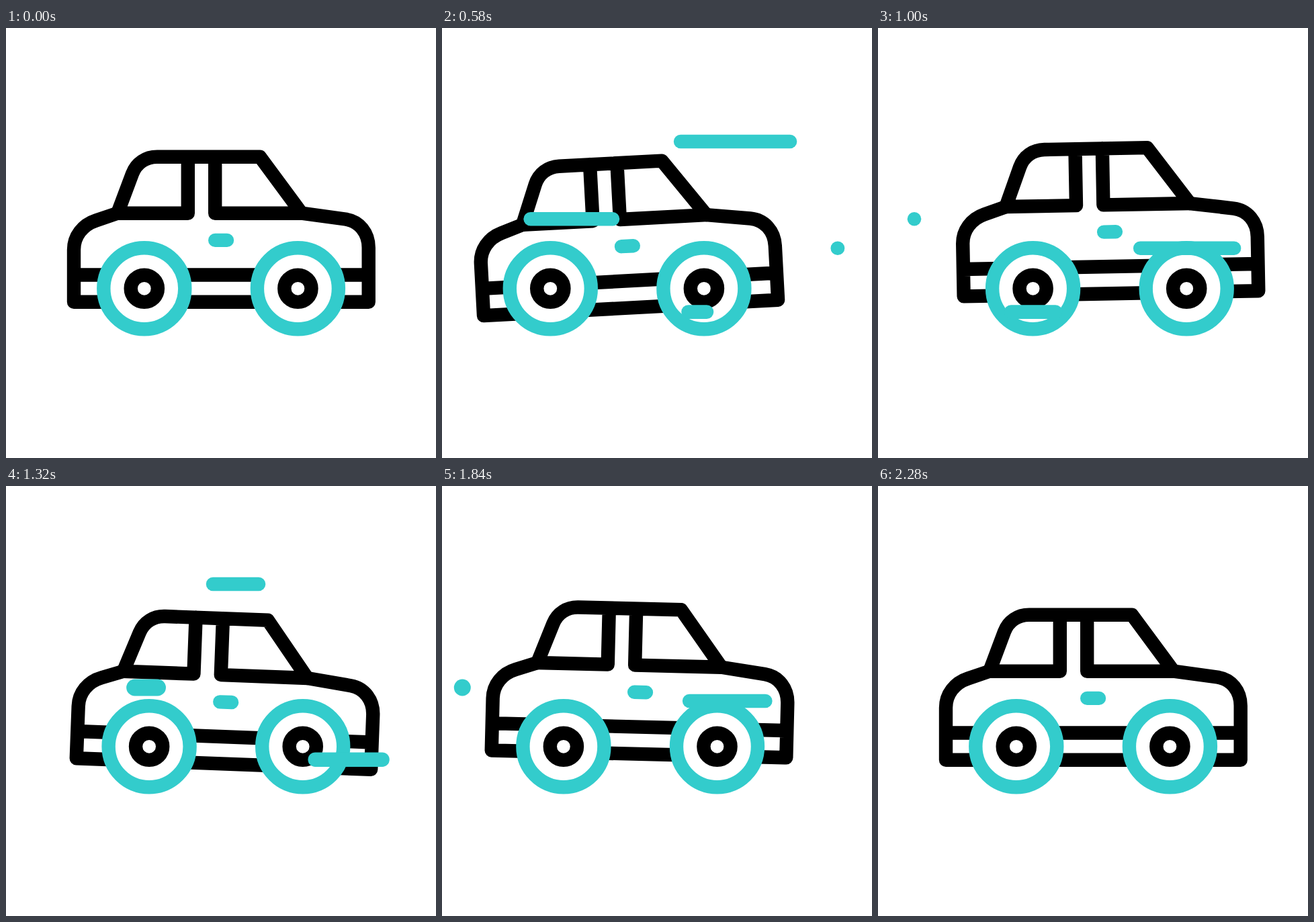
These frames come from a looping animation (640x640 px, 2.42 s). An HTML page:

```html
<!DOCTYPE html>
<html lang="en">
<head>
<meta charset="utf-8">
<title>Car ride</title>
<style>
  html, body { margin: 0; width: 100%; height: 100%; overflow: hidden; background: #fff; }
  svg { display: block; width: 100%; height: 100%; }
  .ink { fill: none; stroke: #000; stroke-width: 20.4; stroke-linejoin: round; stroke-linecap: round; }
  .teal { stroke: #33cccc; }
  .tire { fill: #fff; }
  #streaks { fill: #33cccc; }
</style>
</head>
<body>
<svg viewBox="0 0 640 640">
  <defs>
    <g id="wheel">
      <circle class="ink teal tire" r="60.5"/>
      <circle class="ink" r="20.1"/>
    </g>
  </defs>
  <g id="car">
    <g id="body">
      <path class="ink" d="M166 275.7L134 286.5C114 293 101 310 101 330V407.8H539.7V327C539.7 305 526 287.5 505 284.5L440 275.7M101 367.5H539.7"/>
      <path class="ink" d="M166 275.7L188 217C194 201 208 191.7 225 191.7H378L440 275.7H311.2V191.7M270.8 191.7V275.7H166"/>
      <path class="ink teal" d="M311.2 315.9H329"/>
    </g>
    <use href="#wheel" x="205.8" y="387.8"/>
    <use href="#wheel" x="434.4" y="387.8"/>
  </g>
  <g id="streaks"></g>
</svg>
<script>
  const LOOP = 2420, STEP = 20;

  // [time, value] pairs
  const drive = [[0, 0], [580, -44.5], [1110, 33.5], [1625, -38.6], [2160, 0]];
  const bob = [[0, 0], [480, 11.3], [980, -12.6], [1440, 9.5], [1900, -9.8], [2180, 0]];
  const tilt = [[0, 0], [680, -3.25], [1450, 2.6], [2280, 0]];

  // Each streak runs leftwards: its head leaves first, its tail follows after lag
  const streaks = [
    { y: 169, from: 530, to: 316, start: 231, lag: 280 },
    { y: 284.2, from: 254, to: 54, start: 350, dur: 400, hold: 30 },
    { y: 422.6, from: 394, to: 198, start: 467 },
    { y: 327.8, from: 589, to: 384, start: 570, lag: 260 },
    { y: 146, from: 376, to: 226, start: 1095 },
    { y: 300, from: 225.5, to: 30.3, start: 1214, dur: 400, lag: 220, hold: 26, w: 25 },
    { y: 407.2, from: 560, to: 332, start: 1100, w: 21.5 },
    { y: 320, from: 559, to: 359, start: 1422, lag: 214 }
  ];

  const byId = id => document.getElementById(id);
  const car = byId('car'), body = byId('body');

  function ease(p) {
    p = Math.min(1, Math.max(0, p));
    return p * p * (3 - 2 * p);
  }

  function valueAt(keys, t) {
    const i = keys.findIndex(k => k[0] > t);
    if (i < 0) return keys[keys.length - 1][1];
    const [t0, a] = keys[i - 1], [t1, b] = keys[i];
    return a + (b - a) * ease((t - t0) / (t1 - t0));
  }

  for (const s of streaks) {
    s.el = document.createElementNS('http://www.w3.org/2000/svg', 'rect');
    byId('streaks').append(s.el);
  }

  function drawStreak({ el, y, from, to, start, dur = 480, lag = 240, hold = 0, w = 20.6 }, t) {
    const age = t - start;
    const shown = age >= 0 && age < dur + lag + hold;
    el.setAttribute('visibility', shown ? 'visible' : 'hidden');
    if (!shown) return;
    const head = from + (to - from) * ease(age / dur);
    const tail = from + (to - from) * ease((age - lag) / dur);
    const box = { x: head - w / 2, y: y - w / 2, width: tail - head + w, height: w, rx: w / 2 };
    for (const k in box) el.setAttribute(k, box[k]);
  }

  function draw(t) {
    car.setAttribute('transform', `translate(${valueAt(drive, t)} 0)`);
    body.setAttribute('transform', `translate(0 ${valueAt(bob, t)}) rotate(${valueAt(tilt, t)} 320 310)`);
    for (const s of streaks) drawStreak(s, t);
  }

  const begin = performance.now();
  function tick() {
    const t = (performance.now() - begin) % LOOP;
    draw(Math.floor(t / STEP) * STEP);
    requestAnimationFrame(tick);
  }
  tick();
</script>
</body>
</html>
```
